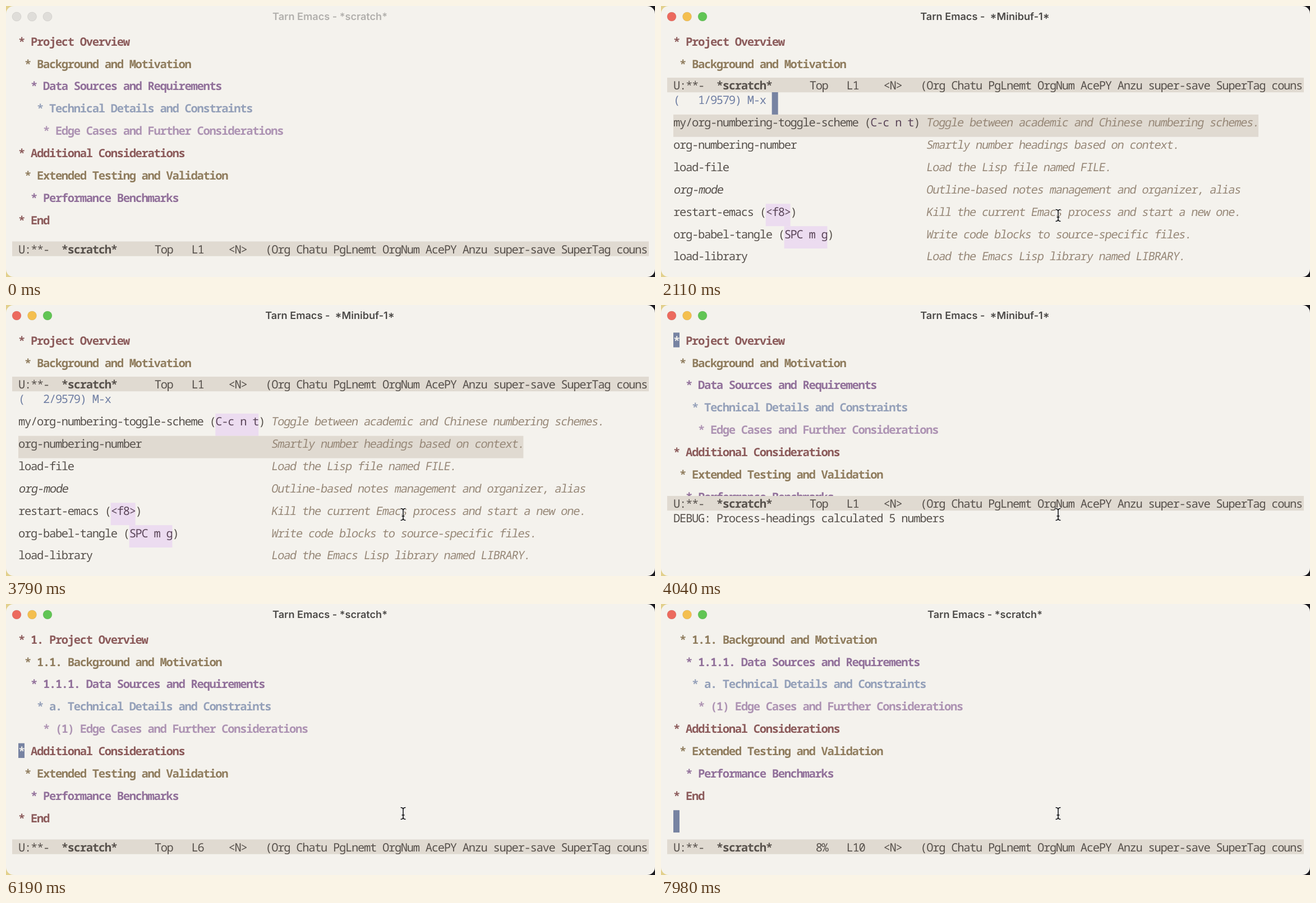
Recreate the animation shown at these times as an HTML page. Size 1157x484 px, loop 8000 ms.

```html
<!DOCTYPE html>
<html lang="en">
<head>
<meta charset="utf-8">
<title>Heading numbering</title>
<style>
  html, body { margin: 0; width: 100%; height: 100%; overflow: hidden; background: #f4f2ed; }
  svg { display: block; width: 1157px; height: 484px; }
  text { white-space: pre; text-rendering: geometricPrecision; }
  .mono { font-family: "Noto Sans Mono", "DejaVu Sans Mono", monospace; font-size: 20.5px; font-stretch: extra-condensed; }
  .title { font: 600 18.1px Inter, "Liberation Sans", sans-serif; text-anchor: middle; }
  .b { font-weight: 700; }
</style>
</head>
<body>
<svg id="stage" viewBox="0 0 1157 484" xmlns="http://www.w3.org/2000/svg"></svg>
<script>
const LOOP = 8000, CELL = 10.98, LEFT = 22, TOP = 49.3, PITCH = 39.87, LINE = 26.3, BASE = 21.4;
const INK = '#57514c', NOTE = '#978878', BAND = '#e0dad1', CURSOR = '#7783a2', KEY = '#ecdcf0', PAPER = '#f4f2ed';
const LEVELS = ['#8b5a5a', '#8f7c5d', '#91709a', '#94a0b9', '#ad93b3'];

const headings = [
  [0, 'Project Overview', '1. '],
  [1, 'Background and Motivation', '1.1. '],
  [2, 'Data Sources and Requirements', '1.1.1. '],
  [3, 'Technical Details and Constraints', 'a. '],
  [4, 'Edge Cases and Further Considerations', '(1) '],
  [0, 'Additional Considerations', ''],
  [1, 'Extended Testing and Validation', ''],
  [2, 'Performance Benchmarks', ''],
  [0, 'End', '']
];

// command, key binding, description
const commands = [
  ['my/org-numbering-toggle-scheme', 'C-c n t', 'Toggle between academic and Chinese numbering schemes.'],
  ['org-numbering-number', '', 'Smartly number headings based on context.'],
  ['load-file', '', 'Load the Lisp file named FILE.'],
  ['org-mode', '', 'Outline-based notes management and organizer, alias'],
  ['restart-emacs', '<f8>', 'Kill the current Emacs process and start a new one.'],
  ['org-babel-tangle', 'SPC m g', 'Write code blocks to source-specific files.'],
  ['load-library', '', 'Load the Emacs Lisp library named LIBRARY.']
];

// each step changes only the named parts of the state
const steps = [
  [0, { active: false, mouse: null, blink: false, line: 1, pick: -1, bar: 420.5, echo: '', echoTitle: '', numbered: false, mini: false, scroll: 0 }],
  [500, { active: true, blink: true, mouse: [724, 462] }],
  [560, { mouse: [713, 392] }],
  [620, { mouse: [708, 374] }],
  [1120, { blink: false }],
  [1550, { blink: true }],
  [2110, { mini: true, pick: 0, bar: 128 }],
  [2540, { blink: false }],
  [3040, { blink: true }],
  [3290, { pick: 1 }],
  [3790, { blink: false }],
  [4040, { blink: true, pick: -1, bar: 341, echo: 'DEBUG: Process-headings calculated 5 numbers' }],
  [4100, { mini: false, numbered: true, bar: 420.5, echo: 'DEBUG: Inserting formatted heading: level=1 number=1 title=', echoTitle: 'Project Overview' }],
  [4600, { blink: false }],
  [5100, { blink: true }],
  [5530, { line: 2, echo: '', echoTitle: '' }],
  [5710, { line: 3 }],
  [5890, { line: 4 }],
  [6010, { line: 5 }],
  [6190, { line: 6 }],
  [6690, { blink: false }],
  [7190, { blink: true }],
  [7560, { line: 7 }],
  [7740, { line: 8 }],
  [7860, { line: 9 }],
  [7980, { line: 10, scroll: 1 }]
];

const stage = document.getElementById('stage');
const esc = s => s.replace(/&/g, '&amp;').replace(/</g, '&lt;');
const rect = (x, y, w, h, fill) => `<rect x="${x}" y="${y}" width="${w}" height="${h}" fill="${fill}"/>`;
const colX = c => LEFT + c * CELL;
const rowY = r => TOP + r * PITCH;

const spacing = { 400: 0, 700: 0 };
function mono(col, top, str, fill, { bold = false, slant = 0 } = {}) {
  const place = `translate(${colX(col)} ${top + BASE}) skewX(${-slant})`;
  return `<text class="mono ${bold ? 'b' : ''}" transform="${place}" fill="${fill}" letter-spacing="${spacing[bold ? 700 : 400]}">${esc(str)}</text>`;
}
const BOLD = { bold: true }, ITALIC = { slant: 9.4 };

// letter spacing that brings each weight onto the character grid
function fitGrid() {
  for (const w of [400, 700]) {
    stage.innerHTML = `<text class="mono ${w > 400 ? 'b' : ''}">${'0'.repeat(50)}</text>`;
    spacing[w] = CELL - stage.firstChild.getComputedTextLength() / 50;
  }
}

function drawChrome(s) {
  const lights = s.active ? ['#ec6a5e', '#f4bf4f', '#61c554'] : Array(3).fill('#dfddd9');
  const name = s.mini ? ' *Minibuf-1*' : '*scratch*';
  return rect(0, 0, 578, 484, '#e2d08c') + rect(578, 0, 579, 484, '#1b1a20') +
    `<rect width="1157" height="484" rx="14" fill="${PAPER}"/>` +
    lights.map((c, i) => `<circle cx="${19 + i * 27.5}" cy="19" r="8" fill="${c}" stroke="#000" stroke-opacity=".1" stroke-width=".8"/>`).join('') +
    `<text class="title" x="577.5" y="25" fill="${s.active ? '#4c4a48' : '#b1afac'}">Tarn Emacs - ${name}</text>`;
}

function drawHeadings(s) {
  return headings.slice(s.scroll).map(([lv, title, num], r) =>
    mono(lv, rowY(r), '* ' + (s.numbered ? num : '') + title, LEVELS[lv], BOLD)).join('');
}

function drawBar(s) {
  const place = s.line > 9 ? ' 8%' : 'Top';
  const rest = `${place}   ${('L' + s.line).padEnd(6)}<N>   (Org Chatu PgLnemt OrgNum AcePY Anzu super-save SuperTag couns`;
  return rect(11, s.bar, 1135, 470 - s.bar, PAPER) + rect(11, s.bar, 1135, 26.2, BAND) +
    mono(0, s.bar, 'U:**-', INK) + mono(7, s.bar, '*scratch*', INK, BOLD) + mono(22.1, s.bar, rest, INK);
}

function drawEcho(s) {
  const y = s.bar + 26;
  return mono(0, y, s.echo, INK) + mono(s.echo.length, y, s.echoTitle, LEVELS[0], BOLD);
}

function drawCommands(s) {
  const y0 = s.bar + 26;
  let out = mono(0, y0, `(   ${s.pick + 1}/9579) M-x`, '#6f7ea3');
  commands.forEach(([name, key, note], r) => {
    const y = y0 + (r + 1) * PITCH, keyCol = name.length + 2;
    if (r === s.pick) out += rect(LEFT, y, (41 + note.length) * CELL, PITCH, BAND);
    else if (key) out += rect(colX(keyCol), y, key.length * CELL, PITCH, KEY);
    out += mono(0, y, name, INK, name === 'org-mode' ? ITALIC : {});
    if (key) {
      out += mono(keyCol - 1, y, '(', INK) + mono(keyCol, y, key, '#5b4659') + mono(keyCol + key.length, y, ')', INK);
    }
    out += mono(41, y, note, NOTE, ITALIC);
  });
  return out;
}

function drawCursor(s) {
  if (!s.blink) return '';
  if (s.pick >= 0) return rect(colX(16), s.bar + 26, CELL, PITCH, CURSOR);
  const y = rowY(s.line - 1 - s.scroll);
  if (s.line > headings.length) return rect(LEFT, y, CELL, PITCH, CURSOR);
  return rect(LEFT, y, CELL, LINE, CURSOR) + mono(0, y, '*', PAPER, BOLD);
}

function drawMouse(s) {
  if (!s.mouse) return '';
  const d = 'M-4.5-10.5Q0-10.5 0-7Q0-10.5 4.5-10.5M0-7V7M-4.5 10.5Q0 10.5 0 7Q0 10.5 4.5 10.5M-2.5 3H2.5';
  const path = (c, w) => `<path d="${d}" fill="none" stroke="${c}" stroke-width="${w}"/>`;
  return `<g transform="translate(${s.mouse})">${path('#fff', 3.6)}${path('#111', 1.6)}</g>`;
}

function draw(s) {
  stage.innerHTML = drawChrome(s) + drawHeadings(s) + drawBar(s) +
    (s.pick >= 0 ? drawCommands(s) : drawEcho(s)) + drawCursor(s) + drawMouse(s);
}

let state = {};
const states = steps.map(([, change]) => state = { ...state, ...change });
let shown = -1;
const start = performance.now();

function tick() {
  const t = (performance.now() - start) % LOOP;
  const n = steps.filter(([at]) => at <= t).length - 1;
  if (n !== shown) draw(states[shown = n]);
  requestAnimationFrame(tick);
}

fitGrid();
tick();
</script>
</body>
</html>
```
